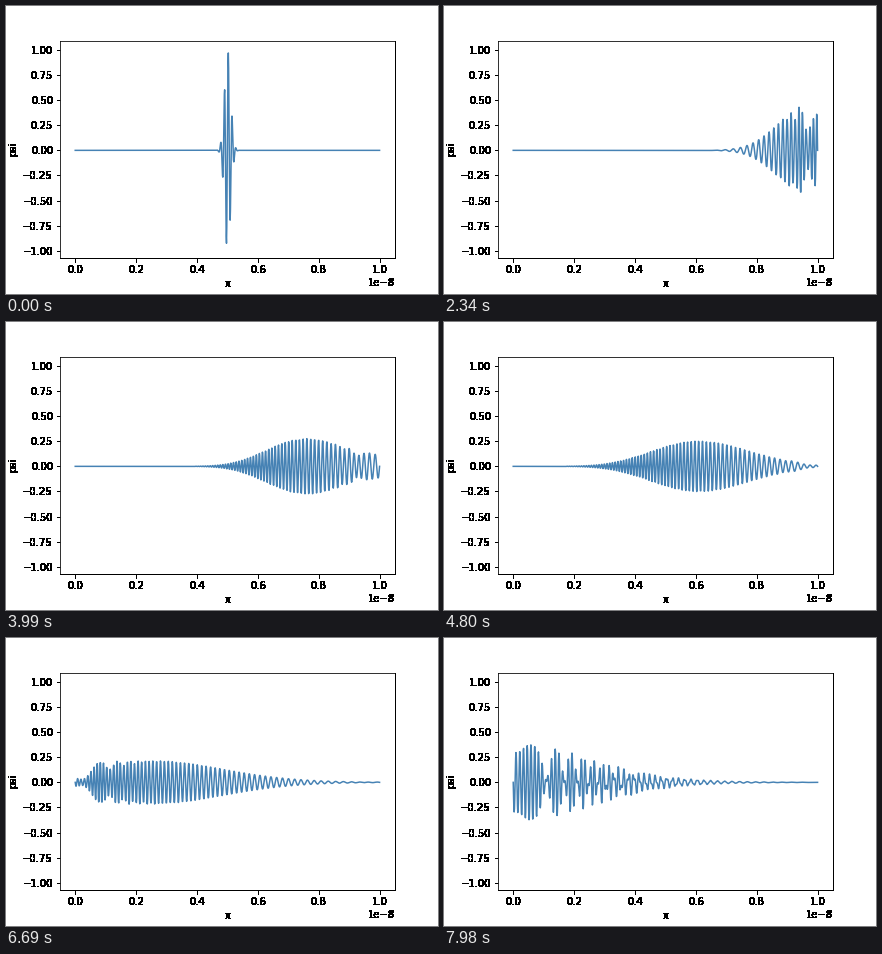
Animation of 432x288 px, one loop 8000 ms. Source, as a matplotlib script:

```python
import numpy as np
import matplotlib.pyplot as plt
from matplotlib.animation import FuncAnimation

W, H, DPI = 432, 288, 72
FRAMES, LOOP_MS = 267, 8000

# Electron in a box, stepped with the Crank-Nicolson scheme
HBAR, MASS = 1.0546e-34, 9.109e-31
L, N = 1e-8, 1000
STEP, STEPS_PER_FRAME, FIRST_STEP = 1e-18, 10, 1
X0, SIGMA, KAPPA = L / 2, 1e-10, 5e10


def wave_frames():
    """Real part of the wave for every frame, from its exact sine modes."""
    x = np.linspace(0, L, N + 1)
    psi = np.exp(-(x - X0) ** 2 / (2 * SIGMA ** 2) + 1j * KAPPA * x)
    k = np.arange(1, N)
    modes = np.sin(np.pi * np.outer(k, k) / N)
    coef = modes @ psi[1:-1] * 2 / N
    a = L / N
    energy = HBAR * STEP / (2 * MASS * a ** 2) * (1 - np.cos(np.pi * k / N))
    phase = -2 * np.arctan(energy)
    steps = FIRST_STEP + STEPS_PER_FRAME * np.arange(FRAMES)
    waves = np.zeros((FRAMES, N + 1))
    spin = np.exp(1j * np.outer(phase, steps))
    waves[:, 1:-1] = (modes @ (coef[:, None] * spin)).real.T
    return x, waves


def hard_render(fig):
    """Draw on a clear page and drop alpha, so text edges turn solid black."""
    fig.set_facecolor((1, 1, 1, 0))
    fig.canvas.draw()
    pixels = np.array(fig.canvas.buffer_rgba())[..., :3]
    fig.set_facecolor("white")
    return pixels


x, waves = wave_frames()
low, high = waves.min(), waves.max()
pad = 0.05 * (high - low)

fig = plt.figure(figsize=(W / DPI, H / DPI), dpi=DPI)
ax = fig.add_axes([0.125, 0.125, 0.775, 0.755], zorder=2)
ax.set_xlim(-0.05 * L, 1.05 * L)
ax.set_ylim(low - pad, high + pad)
ax.set_xlabel("x")
ax.set_ylabel("psi")

backdrop = hard_render(fig)
fig.figimage(backdrop, zorder=1)
ax.axis("off")
line, = ax.plot(x, waves[0], color="steelblue", lw=1.5)


def draw(i):
    line.set_ydata(waves[i])
    return line,


anim = FuncAnimation(fig, draw, frames=FRAMES, interval=LOOP_MS / FRAMES,
                     repeat=True, repeat_delay=0, blit=False)
plt.show()
```
